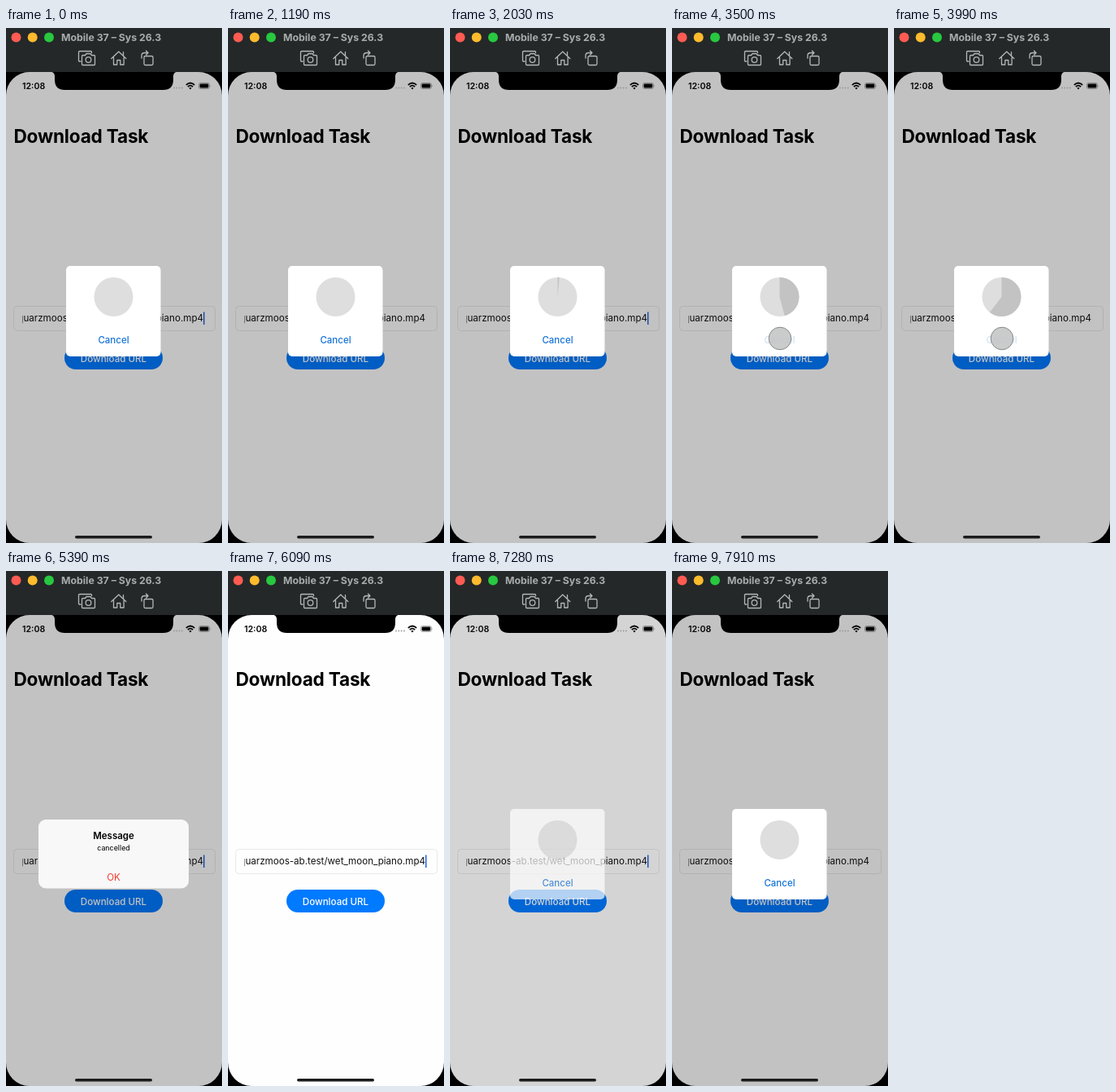
Animation, 266 px wide and 632 px high, one loop 8000 ms. Source, as an HTML page:

```html
<!DOCTYPE html>
<html lang="en">
<head>
<meta charset="utf-8">
<style>
html, body { margin: 0; width: 100%; height: 100%; overflow: hidden; background: #000; }
svg { display: block; width: 266px; height: 632px; font-family: Inter, "Open Sans", sans-serif; }
.mid { text-anchor: middle; }
.icon { fill: none; stroke: #b4b7b7; stroke-width: 1.3; stroke-linejoin: round; stroke-linecap: round; }
.touch { fill: #c4c5c5; fill-opacity: .9; stroke: #858888; stroke-width: 1; opacity: 0; }
.touch + .touch { stroke: #858888; }
</style>
</head>
<body>
<svg viewBox="0 0 266 632">
  <defs>
    <clipPath id="screen"><rect y="54" width="266" height="578" rx="29"/></clipPath>
    <clipPath id="field"><rect x="20" y="342" width="226" height="28"/></clipPath>
  </defs>

  <rect width="266" height="632" fill="#000"/>
  <rect width="266" height="54" fill="#242828"/>
  <circle cx="12.5" cy="11.5" r="6" fill="#ff5b53"/>
  <circle cx="32.7" cy="11.5" r="6" fill="#fdbb2d"/>
  <circle cx="53" cy="11.5" r="6" fill="#28c840"/>
  <text x="68" y="16" font-size="12.3" font-weight="700" fill="#a9acac">Mobile 37 – Sys 26.3</text>
  <g class="icon">
    <path d="M92 41h-1.5q-1 0-1-1v-10.500q0-1 1-1h14q1 0 1 1v1"/>
    <path d="M94.500 33.500h3l1.500-2h5l1.500 2h3q1 0 1 1v10q0 1-1 1h-14q-1 0-1-1v-10q0-1 1-1z"/>
    <circle cx="101.500" cy="39" r="3.300"/>
    <path d="M129.800 37.500l9-8.500 9 8.500M132.500 36v9h4.300v-5.500h4v5.500h4.300v-9M144.500 33.500v-4"/>
    <rect x="170" y="34.500" width="11" height="11" rx="1.500"/>
    <path d="M167 37v-3q0-3.500 3.500-3.500h4M172.500 28l2.500 2.500-2.500 2.500"/>
  </g>

  <g clip-path="url(#screen)">
    <rect y="54" width="266" height="578" fill="#fefefe"/>
    <text x="9.500" y="141" font-size="22.600" font-weight="700" letter-spacing="-.2">Download Task</text>
    <rect x="9.500" y="341.500" width="248" height="30" rx="4" fill="none" stroke="#e9e9e9"/>
    <text x="243" y="360" font-size="11.600" text-anchor="end" fill="#111" clip-path="url(#field)">.quarzmoos-ab.test/wet_moon_piano.mp4</text>
    <rect id="caret" x="243" y="348.500" width="1.600" height="15.500" fill="#2f6fe4"/>
    <rect x="72" y="391" width="121" height="28" rx="14" fill="#007aff"/>
    <text id="urlText" class="mid" x="132.500" y="409.500" font-size="11.600" font-weight="500" fill="#fff">Download URL</text>
    <rect id="dimA" y="54" width="266" height="578" fill-opacity=".235"/>
    <rect id="dimB" y="54" width="266" height="578" fill-opacity=".235"/>

    <g id="progress">
      <rect x="74" y="292" width="116.500" height="111" rx="5" fill="#fff"/>
      <circle cx="132.500" cy="330" r="24" fill="#dededf"/>
      <circle id="pie" cx="132.500" cy="330" r="12" pathLength="1" fill="none" stroke="#c3c3c4"
        stroke-width="24" stroke-dasharray="1 2" transform="rotate(-90 132.500 330)"/>
      <text id="cancel" class="mid" x="132.500" y="386.500" font-size="11.500" font-weight="500" fill="#1673d8">Cancel</text>
    </g>

    <rect id="panel" x="40" y="305" width="185" height="84.500" rx="9" fill="#f8f8f8"/>
    <g id="message" class="mid">
      <text x="132.500" y="329" font-size="11.500" font-weight="600">Message</text>
      <text x="132.500" y="343" font-size="8.900">cancelled</text>
      <text x="132.500" y="379.500" font-size="11.600" fill="#f5392f">OK</text>
    </g>

    <circle id="tapCancel" class="touch" cx="133" cy="381" r="13.800"/>
    <circle id="tapOk" class="touch" cx="133" cy="375" r="13.800"/>
    <circle id="tapUrl" class="touch" cx="133" cy="405" r="13.800"/>

    <path d="M54 53.500q6 .5 6 6v4q0 12.500 12.500 12.500h121q12.500 0 12.500-12.500v-4q0-5.500 6-6z"/>
    <text x="20" y="75" font-size="10.600" font-weight="600">12:08</text>
    <g fill="#999"><circle cx="207" cy="73.500" r=".9"/><circle cx="210.300" cy="73.500" r=".9"/><circle cx="213.600" cy="73.500" r=".9"/><circle cx="216.900" cy="73.500" r=".9"/></g>
    <g fill="none" stroke="#000" stroke-width="1.700">
      <path d="M221.800 69.800q5.200-4.600 10.400 0M223.800 72q3.200-2.700 6.400 0"/>
    </g>
    <path d="M225.300 73.600q1.700-1.300 3.400 0l-1.700 1.900z"/>
    <rect x="237.500" y="67.500" width="13" height="7" rx="2" fill="none" stroke="#000" stroke-opacity=".4" stroke-width=".8"/>
    <rect x="238.600" y="68.600" width="10.800" height="4.800" rx="1.100"/>
    <path d="M251.600 69.700q1.300 1.300 0 2.600z" fill-opacity=".5"/>
    <rect x="85" y="623" width="95" height="3.600" rx="1.800" fill="#1c1c1c"/>
  </g>
</svg>
<script>
const LOOP = 8000;

// steps: [ms, value] pairs, linear in between
function track(id, steps, prop = 'opacity') {
  const all = [[0, steps[0][1]], ...steps, [LOOP, steps[steps.length - 1][1]]];
  document.getElementById(id).animate(
    all.map(([t, v]) => ({ offset: t / LOOP, [prop]: v })),
    { duration: LOOP, iterations: Infinity }
  );
}

// a value held between two times with short ramps
const hold = (from, to, rest, value) =>
  [[from - 20, rest], [from, value], [to, value], [to + 50, rest]];

const blink = [];
for (const [off, on] of [[640, 1220], [1700, 1960], [2520, 2900], [3400, 4000], [4440, 4800], [5590, 5860], [6590, 6900]])
  blink.push([off, 1], [off + 90, 0], [on, 0], [on + 70, 1]);
track('caret', [...blink, [7570, 1], [7720, 0]]);

const appear = [[7140, 0], [7210, .36], [7280, .7], [7350, .88], [7420, .96], [7560, 1]];
track('dimA', [[4790, 1], [5040, .9], [5250, 0], ...appear]);
track('progress', [[4790, 1], [4900, .9], [5040, .6], [5140, .25], [5250, 0], ...appear]);

const vanish = [[5790, 1], [5880, .65], [5960, .3], [6070, 0]];
track('dimB', [[4830, 0], [5040, .85], [5250, 1], ...vanish]);
track('panel', [[4900, 0], [5040, .5], [5140, .82], [5280, 1], ...vanish]);
track('message', [[4900, 0], [5040, .85], [5180, 1], ...vanish]);

track('pie', [[1980, 1], [4270, .312], [5300, .312], [5301, 1]], 'strokeDashoffset');

track('cancel', hold(3450, 4230, 1, .2));
track('urlText', hold(6590, 6700, 1, .4));
track('tapCancel', hold(3450, 4230, 0, 1));
track('tapOk', hold(5540, 5660, 0, 1));
track('tapUrl', hold(6590, 6700, 0, 1));
</script>
</body>
</html>
```
